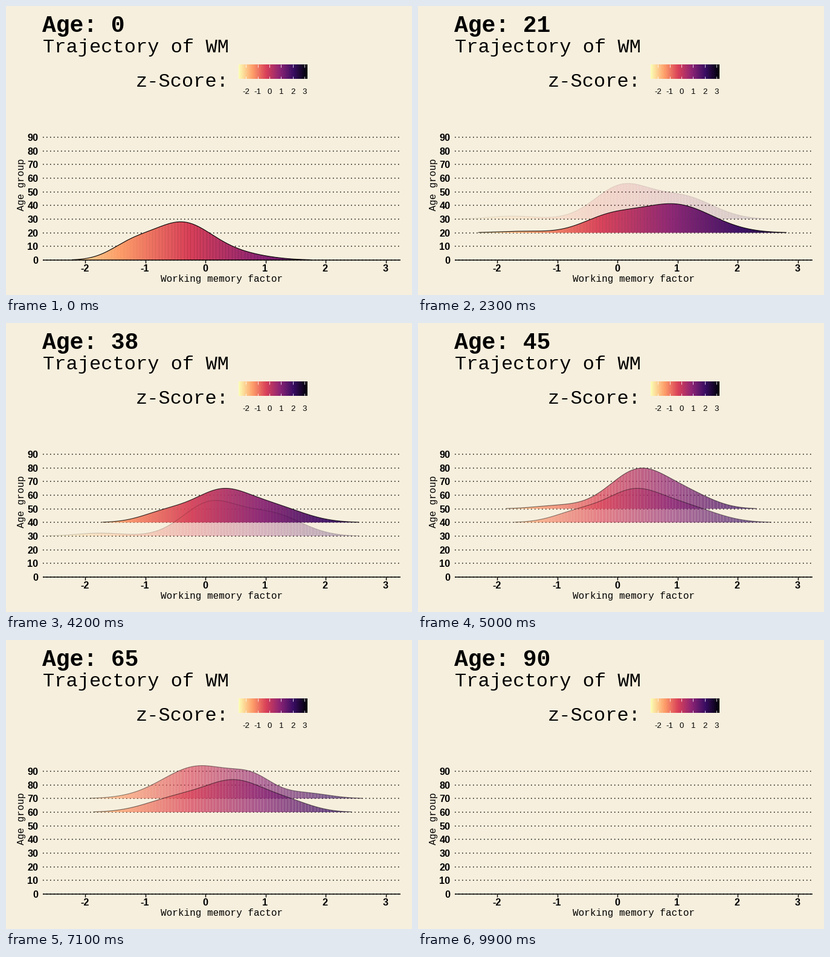
Write a matplotlib script that moves like this. It is 672 px wide and 480 px high and loops after 10000 ms.

```python
import numpy as np
import matplotlib.pyplot as plt
from matplotlib.animation import FuncAnimation
from matplotlib.colors import LinearSegmentedColormap
from matplotlib.patches import Polygon

W, H, DPI = 672, 480, 100
PT = 72 / DPI
FRAMES, STEP = 100, 11      # eleven frames per age decade
LAST_FADE = 5               # the oldest group leaves faster
Z_MIN, Z_MAX = -2.62, 3.26
BG = "#f7efdd"
MONO, SANS = "Liberation Mono", "Liberation Sans"

cmap = LinearSegmentedColormap.from_list(
    "heat", ["#fcfdb4", "#fe9f6a", "#d94058", "#8c2474", "#380d62", "#000004"])

# Each age group is a sum of bell curves: (centre z, width z, height px)
GROUPS = [
    [(-.4, .5, 61), (-1.25, .35, 21), (.55, .5, 9)],
    [(.4, .65, 56), (-.9, .5, 10)],
    [(.95, .62, 47), (-.15, .45, 23), (-1.6, .4, 2.5)],
    [(.08, .46, 54), (1.1, .5, 36), (-1.75, .4, 5)],
    [(.25, .45, 48), (1.1, .52, 26), (-.65, .4, 17)],
    [(.38, .5, 66), (1.25, .4, 17), (-1, .4, 5)],
    [(.5, .5, 50), (-.5, .5, 22), (1.4, .4, 14)],
    [(-.1, .6, 54), (.8, .33, 25), (1.65, .4, 9)],
    [(.6, .3, 64), (-.75, .38, 37), (0, .35, 24)],
]


def px(z):
    return 330 + 99.5 * z


def py(age):
    return 422 - 2.267 * age


fig = plt.figure(figsize=(W / DPI, H / DPI), dpi=DPI, facecolor=BG)
ax = fig.add_axes([0, 0, 1, 1])
ax.axis("off")


def label(x, y, s, size, font=MONO, **kw):
    kw.setdefault("va", "baseline")
    return ax.text(x, y, s, fontsize=size * PT, family=font, color="black", **kw)


def line(xs, ys, width, color="black", **kw):
    kw.setdefault("solid_capstyle", "butt")
    return ax.plot(xs, ys, color=color, lw=width * PT, **kw)[0]


# Headings
title = label(60, 43, "", 38, weight="bold")
label(61, 77, "Trajectory of WM", 32)
label(215, 134, "z-Score:", 32)

# Colour bar
ax.imshow(np.linspace(0, 1, 256)[None, :], cmap=cmap, aspect="auto",
          extent=(385, 499, 121, 97), interpolation="bilinear", zorder=1)
for z in range(-2, 4):
    x = 436 + 19.35 * z
    line([x, x], [97, 101.5], 1, "white", alpha=.8)
    line([x, x], [116.5, 121], 1, "white", alpha=.8)
    label(x, 146.5, str(z), 13.3, SANS, ha="center")

# Axes
for age in range(0, 100, 10):
    line([61, 652.5], [py(age)] * 2, 1.5, dashes=(1, 3), dash_capstyle="butt", zorder=1)
    label(53.5, py(age) + 6, str(age), 16.3, SANS, weight="bold", ha="right")
line([60.5, 653], [422, 422], 1.5, zorder=30)
for z in range(-2, 4):
    line([px(z)] * 2, [422, 426.5], 1.4)
    label(px(z) - .5, 441, str(z), 16.3, SANS, weight="bold", ha="center")
label(357, 458, "Working memory factor", 16, ha="center")
label(33.5, 296.5, "Age group", 16, rotation=90, ha="right", va="center")

# Column colours shared by all ridges, with thin seams between strips
cols = np.arange(W) + .5
zs = (cols - px(0)) / 99.5
fill = cmap(np.clip((zs - Z_MIN) / (Z_MAX - Z_MIN), 0, 1))[:, :3]
seam = ((cols * .19) % 1 < .19) * np.clip((zs + 1.4) / 1.2, .15, 1)


class Ridge:
    def __init__(self, index, bells):
        self.index = index
        base = py(10 * index)
        z = np.linspace(Z_MIN, Z_MAX, 500)
        h = sum(top * np.exp(-((z - mid) / width) ** 2 / 2) for mid, width, top in bells)
        keep = h > .5
        xs, ys = px(z[keep]), base - h[keep]
        outline = np.column_stack([np.r_[xs[0], xs, xs[-1]], np.r_[base, ys, base]])
        shape = Polygon(outline, fc="none", ec="none")
        ax.add_patch(shape)
        order = 20 - index
        self.image = ax.imshow(np.zeros((1, W, 4)), extent=(0, W, base + 1, base - 80),
                               aspect="auto", interpolation="nearest", zorder=order)
        self.image.set_clip_path(shape)
        self.edge = line(xs, ys, 1.1, zorder=order + .5)

    def show(self, frame):
        t = frame - self.index * STEP
        span = LAST_FADE if self.index == len(GROUPS) - 1 and t > 0 else STEP
        a = max(0, 1 - abs(t) / span)
        self.image.set_visible(a > 0)
        self.edge.set_visible(a > 0)
        if a > 0:
            # Seams look dark on a solid ridge and pale on a fading one
            dark = .14 * seam * max(0, 2 * a - 1)
            pale = .25 * seam * min(1, 2 * (1 - a))
            alpha = (1 - (1 - a) ** 1.7) * (1 - pale)
            self.image.set_data(np.column_stack([fill * (1 - dark[:, None]), alpha])[None])
            self.edge.set_alpha(a)


ridges = [Ridge(i, bells) for i, bells in enumerate(GROUPS)]
ax.set_xlim(0, W)
ax.set_ylim(H, 0)


def update(frame):
    title.set_text(f"Age: {round(frame * 90 / (FRAMES - 1))}")
    for ridge in ridges:
        ridge.show(frame)


anim = FuncAnimation(fig, update, frames=FRAMES, interval=100, repeat=True,
                     repeat_delay=0, init_func=lambda: update(0))
plt.show()
```
